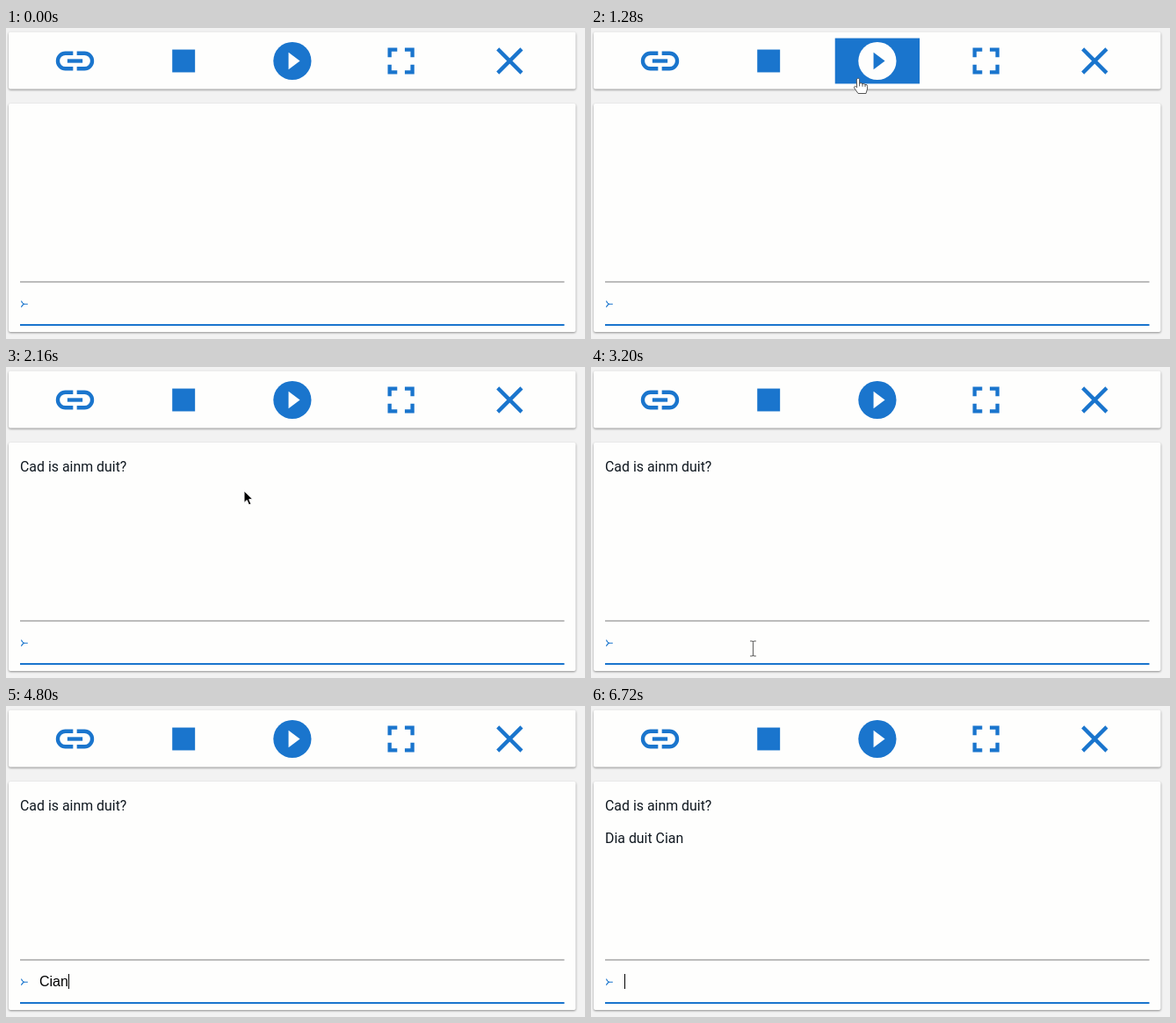
Recreate the animation shown at these times as an HTML page. Size 659 px wide and 354 px high, loop 6880 ms.

```html
<!DOCTYPE html>
<html lang="ga">
<head>
<meta charset="utf-8">
<title>Console</title>
<style>
  html, body { margin: 0; width: 100%; height: 100%; overflow: hidden; background: #f2f2f2; }
  svg { display: block; --blue: #1a75cd; --paper: #fefefd; }
  .card { fill: var(--paper); filter: drop-shadow(0 1px 1.2px rgba(0, 0, 0, .42)); }
  .solid { fill: var(--blue); }
  .line { fill: none; stroke: var(--blue); stroke-width: 2; }
  .cutout { fill: var(--paper); }
  .plate { fill: none; }
  .hover .solid { fill: var(--paper); }
  .hover .cutout, .hover .plate { fill: var(--blue); }
  .output { font: 15.9px Roboto, sans-serif; fill: #101820; }
  .input { font: 16px "Liberation Sans", Arial, sans-serif; fill: #000; }
</style>
</head>
<body>
<svg width="659" height="354" viewBox="0 0 659 354">
  <defs>
    <path id="half-link" d="M-1-4.05H-5a4.05 4.05 0 0 0 0 8.1H-1"/>
    <path id="corner" d="M-6-2V-6H-2"/>
    <path id="slash" d="M-6.3-6.3L6.3 6.3"/>
  </defs>

  <rect class="card" x="3" y="4.5" width="645.5" height="65" rx="2"/>
  <rect class="card" x="3" y="86" width="645.5" height="260" rx="2"/>

  <g id="toolbar">
    <g class="line">
      <use href="#half-link"/>
      <use href="#half-link" transform="scale(-1 1)"/>
      <path d="M-4 0H4"/>
    </g>
    <rect class="solid" x="-6" y="-6" width="12" height="12"/>
    <g id="play">
      <rect class="plate" x="-22.3" y="-12" width="44.6" height="24"/>
      <circle class="solid" r="10"/>
      <path class="cutout" d="M-2-4.5L4 0L-2 4.5Z"/>
    </g>
    <g class="line">
      <use href="#corner"/>
      <use href="#corner" transform="rotate(90)"/>
      <use href="#corner" transform="rotate(180)"/>
      <use href="#corner" transform="rotate(270)"/>
    </g>
    <g class="line">
      <use href="#slash"/>
      <use href="#slash" transform="rotate(90)"/>
    </g>
  </g>

  <text class="output" id="question" x="16" y="119">Cad is ainm duit?</text>
  <text class="output" id="reply" x="16" y="156">Dia duit Cian</text>

  <rect x="16" y="288" width="619.5" height="2" fill="#bcbcbc"/>
  <rect class="solid" x="16" y="337" width="619.5" height="2"/>
  <path class="line" style="stroke-width:1.1" d="M17.4 310.6Q18.8 314 21 314.2H24.8M17.4 317.8Q18.8 314.4 21 314.2"/>
  <text class="input" id="typed" x="38" y="319"></text>
  <rect id="caret" y="305" width="1" height="17"/>

  <g id="pointer">
    <path id="arrow" d="M0 0V13.5L3.2 10.6L5.5 16L8 15L5.7 9.7H10Z" stroke="#fff"/>
    <g id="hand" fill="#fff" stroke="#555" stroke-linejoin="round" stroke-linecap="round">
      <path d="M-1.6 1.6Q0-1.6 1.6 1.6V6Q4 5 5 6.7Q7 5.7 8 7.5Q10.6 6.7 10.6 9.3V12L9 17.5H0L-4.4 11.2Q-5-8 -1.6 10.4Z" visibility="hidden"/>
      <path id="palm" d="M-1.6 1.6Q0-1.6 1.6 1.6V6Q4 5 5 6.7Q7 5.7 8 7.5Q10.6 6.7 10.6 9.3V12L9 17.5H0L-4.4 11.2Q-4.6 7.6-1.6 10.4Z"/>
      <path d="M1.6 6V9M5 6.7V9.3M8 7.5V9.7"/>
    </g>
    <path id="beam" d="M-3.5-8.5H-1L0-7.5L1-8.5H3.5M0-7.5V7.5M-3.5 8.5H-1L0 7.5L1 8.5H3.5" fill="none" stroke="#666" stroke-width="1.1"/>
  </g>
</svg>
<script>
const LOOP = 6880, TICK = 80;
const ENTER_STAGE = 1040, SHOW_QUESTION = 1760, FOCUS = 2700, TYPE = 4560, SUBMIT = 5760;
const BLINK = 500;
const NAME = "Cian";

// Places the pointer passes: time, x, y.
const route = [
  [ENTER_STAGE, 200, 235], [1280, 304, 57], [1440, 316, 57],
  [2000, 316, 57], [2160, 271, 141], [2480, 184.5, 320.5]
];

const $ = id => document.getElementById(id);
const show = (id, on) => $(id).setAttribute("visibility", on ? "visible" : "hidden");

[...$("toolbar").children].forEach((icon, i) =>
  icon.setAttribute("transform", `translate(${78.5 + i * 123.7} 37.5) scale(2.16)`));

function pointerAt(t) {
  const next = route.findIndex(point => point[0] > t);
  if (next < 1) return route.at(next).slice(1);
  const [t0, x0, y0] = route[next - 1], [t1, x1, y1] = route[next];
  const u = (t - t0) / (t1 - t0);
  return [x0 + (x1 - x0) * u, y0 + (y1 - y0) * u];
}

function drawPointer(t) {
  const present = t >= ENTER_STAGE && t < TYPE;
  const [x, y] = pointerAt(t);
  const overPlay = present && Math.abs(x - 326) < 48 && Math.abs(y - 37.5) < 26;
  const overInput = present && y > 290;
  $("play").classList.toggle("hover", overPlay);
  show("hand", overPlay);
  show("beam", overInput);
  show("arrow", present && !overPlay && !overInput);
  $("pointer").setAttribute("transform", `translate(${x} ${y})`);
}

function drawInput(t) {
  const count = t < TYPE || t >= SUBMIT ? 0 : (t - TYPE) / TICK + 1;
  const typing = count > 0 && count <= NAME.length;
  const blinkOn = t >= FOCUS && (t - FOCUS) % (2 * BLINK) < BLINK;
  $("typed").textContent = NAME.slice(0, count);
  $("caret").setAttribute("x", 38 + Math.round($("typed").getComputedTextLength()));
  show("caret", typing || blinkOn);
}

const start = performance.now();
function frame() {
  const elapsed = (performance.now() - start) % LOOP;
  const t = Math.floor(elapsed / TICK) * TICK;
  drawPointer(t);
  drawInput(t);
  show("question", t >= SHOW_QUESTION);
  show("reply", t >= SUBMIT);
  requestAnimationFrame(frame);
}
frame();
</script>
</body>
</html>
```
